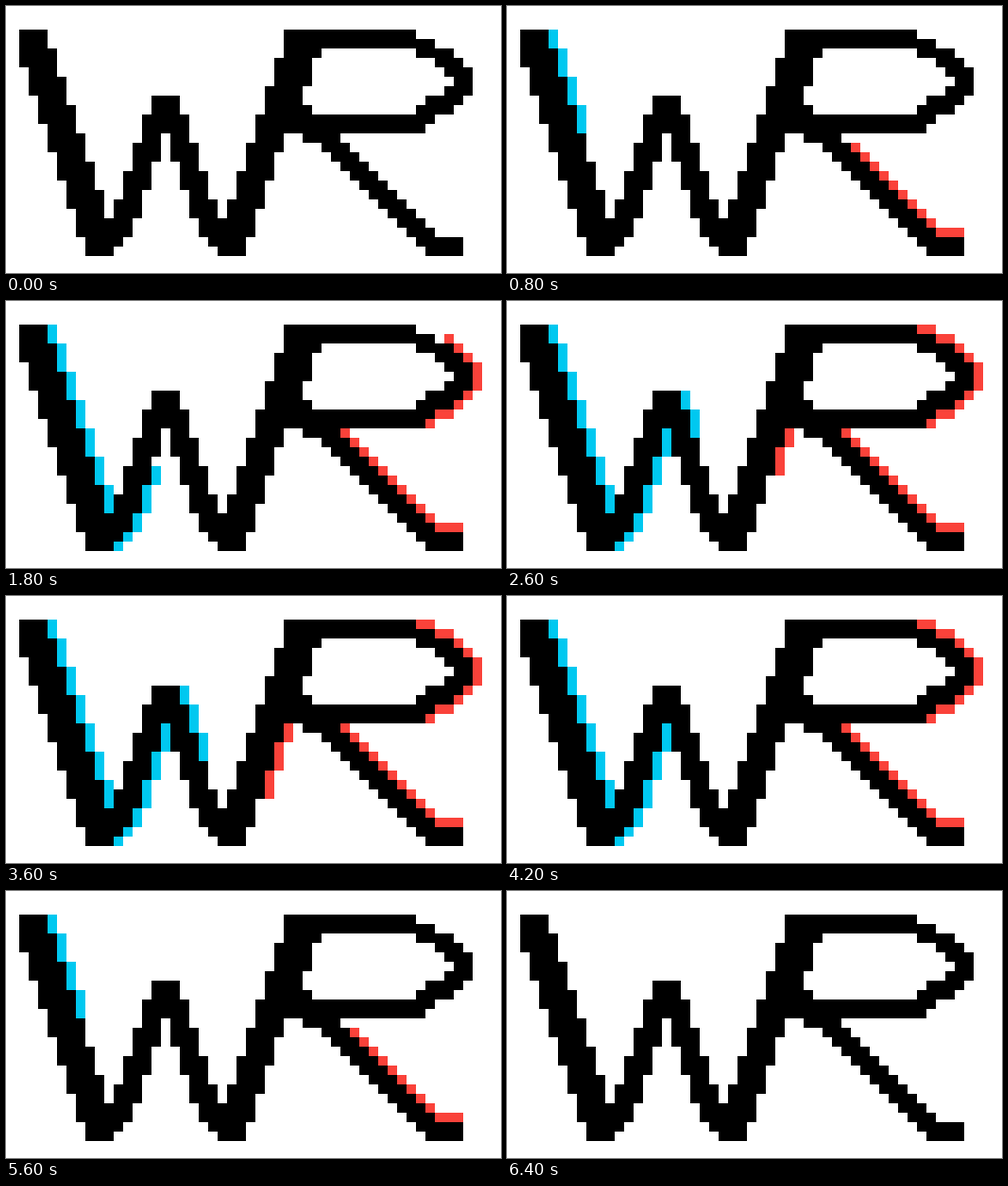
Recreate the animation shown at these times as an HTML page. Size 524 by 283 pixels, loop 6600 ms.

```html
<!DOCTYPE html>
<html lang="en">
<head>
<meta charset="utf-8">
<title>WR</title>
<style>
  html, body { margin: 0; width: 100%; height: 100%; overflow: hidden; background: #fff; }
  svg { display: block; width: 524px; height: 283px; }
</style>
</head>
<body>
<svg viewBox="0 0 524 283" shape-rendering="crispEdges">
  <rect width="524" height="283" fill="#fff"/>
  <g transform="translate(4 5) scale(10)" fill="none">
    <path id="letters" fill="#000" fill-rule="evenodd"/>
    <path id="blue" stroke="#00c8f0"/>
    <path id="red" stroke="#fa423a"/>
  </g>
</svg>
<script>
const STEP = 200, FRAMES = 33;
const byId = id => document.getElementById(id);
const rep = (s, n) => s.repeat(n);

// Outline of both letters on a 10 px grid, then the bowl of the R.
byId('letters').setAttribute('d',
  'M1 2h3v2' + rep('h1v3', 6) + 'h1v-2' + rep('h1v-3', 3) + 'h1v-2' +
  'h3v2' + rep('h1v3', 3) + 'h1v2h1v-2' + rep('h1v-3', 6) +
  'h14v1h2v1h2v1h1v1h1v3h-1v1h-1v1h-2v1h-1v1h-9v1h1' +
  rep('v1h1', 9) + 'v1h3v2h-4' + rep('v-1h-1', 11) + 'v-1h-2v-1h-2v2' +
  rep('h-1v3', 3) + 'h-1v2h-3' + rep('v-1h-1', 2) + 'v-2h-1' + rep('v-3h-1', 2) +
  'v-3h-1v3' + rep('h-1v3', 2) + 'h-1v2' + rep('h-1v1', 2) + 'h-3v-2h-1' +
  rep('v-3h-1', 6) + 'z' +
  'M33 4h10v1h2v1h1v1h1v1h-1v1h-2v1h-1v1h-11v-1h-1v-2h1v-3h1z');

// A vertical bar, and a rising diagonal of n cells.
const col = (x, y, h) => `M${x + .5} ${y}v${h}`;
const diag = (x, y, n, d) => col(x, y, 1) + rep(`m${d} -2v1`, n - 1);

// What each step adds to the coloured edges.
const blue = [
  col(4, 2, 2), col(5, 4, 3), col(6, 7, 3), col(7, 10, 3),
  col(8, 13, 3), col(9, 16, 3) + col(10, 19, 3),
  diag(11, 25, 3, 1), col(13, 22, 1) + col(14, 20, 2),
  col(14, 19, 1) + col(15, 17, 2), diag(15, 16, 2, 1),
  col(16, 13, 2), col(18, 9, 2),
  col(19, 11, 3), col(20, 14, 3), col(21, 17, 3), col(22, 20, 2)
];
const red = [
  'M45 23.5h3', diag(44, 22, 3, -1), diag(41, 19, 3, -1), diag(38, 16, 3, -1),
  col(35, 13, 1) + diag(44, 12, 2, 1), diag(46, 11, 3, 1),
  col(49, 7, 2), diag(49, 6, 2, -1), diag(47, 4, 2, -1), diag(45, 3, 2, -1),
  col(43, 2, 1), col(29, 13, 2),
  col(28, 15, 3), col(27, 18, 3), col(26, 21, 3), col(25, 24, 2)
];

// The edges grow for half the loop, then retract the same way.
function draw(ms) {
  const i = Math.floor(ms / STEP) % FRAMES;
  const n = Math.min(i, FRAMES - 1 - i);
  byId('blue').setAttribute('d', blue.slice(0, n).join(''));
  byId('red').setAttribute('d', red.slice(0, n).join(''));
}

const start = performance.now();
function tick() {
  draw(performance.now() - start);
  requestAnimationFrame(tick);
}
tick();
</script>
</body>
</html>
```
